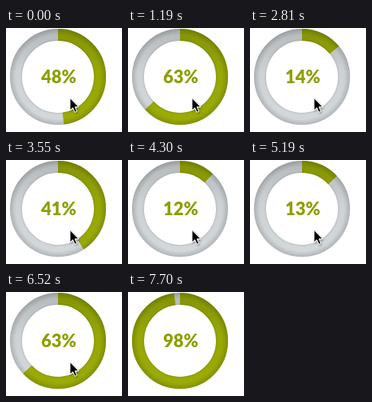
An HTML page that plays this animation: 145x130 px, repeating every 8360 ms.

```html
<!DOCTYPE html>
<html lang="en">
<head>
<meta charset="utf-8">
<title>Ring gauge</title>
<style>
  html, body { margin: 0; width: 100%; height: 100%; overflow: hidden; background: #fff; }
  svg { display: block; width: 145px; height: 130px; }
  .ring { fill: none; stroke-width: 15; }
  .label { font: 900 22px Lato, sans-serif; fill: #8d9f00; text-anchor: middle; }
</style>
</head>
<body>
<svg viewBox="0 0 145 130">
  <defs>
    <radialGradient id="bevel" gradientUnits="userSpaceOnUse" cx="65" cy="61" r="60">
      <stop offset=".75" stop-color="#000" stop-opacity=".1"/>
      <stop offset=".79" stop-color="#000" stop-opacity="0"/>
      <stop offset=".88" stop-color="#000" stop-opacity="0"/>
      <stop offset="1" stop-color="#000" stop-opacity=".16"/>
    </radialGradient>
    <linearGradient id="shade" gradientUnits="userSpaceOnUse" x1="0" y1="1" x2="0" y2="121">
      <stop offset="0" stop-color="#000" stop-opacity=".15"/>
      <stop offset=".45" stop-color="#000" stop-opacity=".03"/>
      <stop offset="1" stop-color="#000" stop-opacity="0"/>
    </linearGradient>
    <filter id="soft" x="-50%" y="-50%" width="200%" height="200%">
      <feDropShadow dx="1" dy="1.5" stdDeviation="1" flood-opacity=".35"/>
    </filter>
  </defs>
  <circle class="ring" cx="65" cy="61" r="52.5" stroke="#d3d8db"/>
  <circle class="ring" id="bar" cx="65" cy="61" r="52.5" stroke="#9bac05"
          pathLength="100" transform="rotate(-90 65 61)"/>
  <circle class="ring" cx="65" cy="61" r="52.5" stroke="url(#shade)"/>
  <circle class="ring" cx="65" cy="61" r="52.5" stroke="url(#bevel)"/>
  <text class="label" id="label" x="66" y="69">48%</text>
  <path id="cursor" d="M0 0V15.5L3.6 12.2 6 17.8 8.6 16.7 6.2 11.2H11Z"
        fill="#000" stroke="#fff" stroke-width="1" filter="url(#soft)"/>
</svg>
<script>
  const LOOP = 8360, STEP = 148, LAST = 52;

  // [step, percent] turning points, linear in between
  const keys = [
    [0, 48], [1, 0], [7, 65], [8, 63], [13, 23], [15, 0], [17, 0],
    [23, 42], [24, 41], [25, 36], [31, 0], [32, 0],
    [35, 13], [40, 28], [44, 63], [48, 75], [52, 98]
  ];
  const [bar, label, cursor] = ['bar', 'label', 'cursor'].map(id => document.getElementById(id));

  function percentAt(step) {
    const i = Math.max(1, keys.findIndex(k => k[0] >= step));
    const [s0, v0] = keys[i - 1], [s1, v1] = keys[i];
    return Math.round(v0 + (v1 - v0) * (step - s0) / (s1 - s0));
  }

  function draw(now) {
    const time = now % LOOP;
    const step = Math.min(LAST, Math.floor(time / STEP + .08));
    const percent = percentAt(step);
    bar.setAttribute('stroke-dasharray', `${percent} 200`);
    bar.style.visibility = percent ? 'visible' : 'hidden';
    label.textContent = percent + '%';

    // The pointer rests, then leaves to the lower right
    const away = Math.max(0, step - 49) / 2;
    cursor.setAttribute('transform', `translate(${80 + 34 * away} ${87.5 + 21 * away})`);
    cursor.style.visibility = step < LAST ? 'visible' : 'hidden';
  }

  const start = performance.now();
  function tick() {
    draw(performance.now() - start);
    requestAnimationFrame(tick);
  }
  tick();
</script>
</body>
</html>
```
